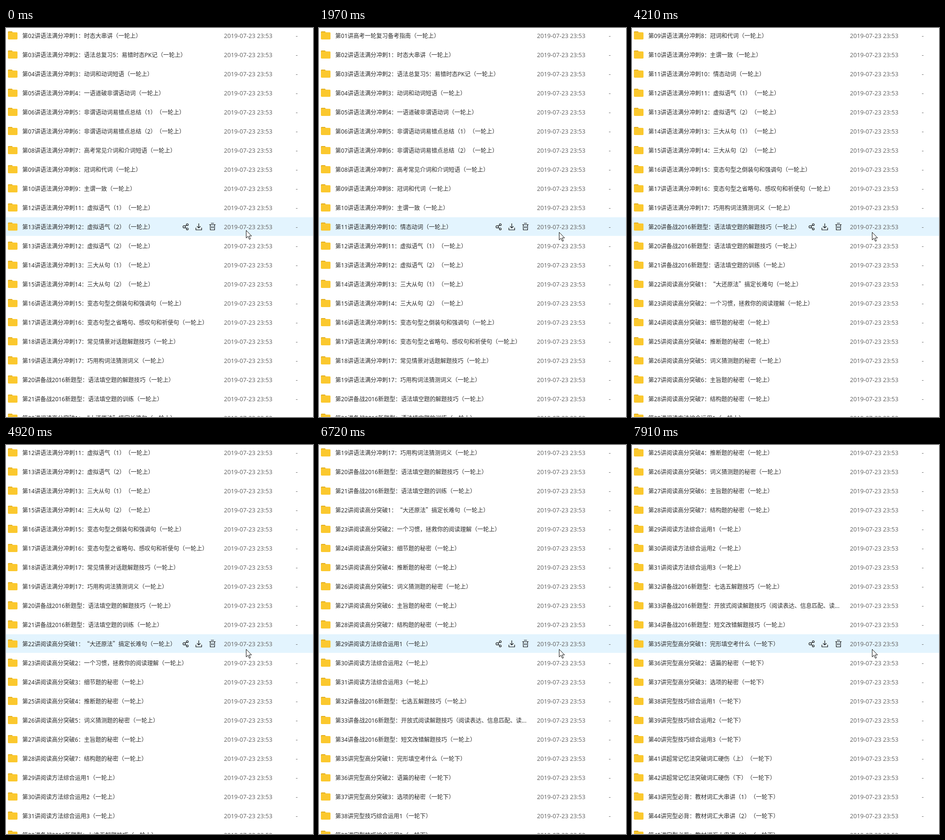
Write an HTML page that moves like this. It is 641 px wide and 814 px high and loops after 8000 ms.

```html
<!DOCTYPE html>
<html lang="zh-CN">
<head>
<meta charset="utf-8">
<title>课程列表</title>
<style>
html, body { margin: 0; width: 100%; height: 100%; overflow: hidden; background: #fff; }
svg { display: block; }
text { font: 12px "Noto Sans CJK SC", "Noto Sans CJK", sans-serif; text-spacing-trim: space-all; font-kerning: none; fill: #2b2b2b; }
.latin { font-family: "Noto Sans", sans-serif; }
.meta { font: 12.6px "Noto Sans", "Open Sans", sans-serif; fill: #6a6a6a; }
.icon { fill: none; stroke: #111; stroke-width: 1.2; }
</style>
</head>
<body>
<svg width="641" height="814" viewBox="0 0 641 814">
  <defs>
    <g id="folder">
      <path d="M4 14V8.5Q4 7 5.5 7H12Q13 7 13.5 8L14 9.5V14Z" fill="#e3b022"/>
      <rect x="4" y="9" width="20" height="15" rx="1.8" fill="#fbc82e"/>
    </g>
  </defs>
  <rect y="396" width="641" height="39" fill="#e3f4fe"/>
  <g id="rows"></g>
  <g class="icon">
    <circle cx="372" cy="416" r="2.5"/>
    <circle cx="378.5" cy="411.5" r="2"/>
    <circle cx="378.5" cy="420.5" r="2"/>
    <path d="M374 414.5L376.8 412.7M374 417.5L376.8 419.3"/>
    <path d="M402.5 409V418.5M398.8 414.8L402.5 418.5L406.2 414.8M396.5 418V422.5H408.5V418"/>
    <path d="M424.5 411.5H437.5M428 408.5H434M426.5 411.5V422.5H435.5V411.5M429.5 415V419M432.5 415V419"/>
  </g>
  <path id="cursor" d="M.5 .5V16.5L4.2 13L7 19.3L9.4 18.3L6.7 12.2H11.7Z" fill="#fff" stroke="#111"/>
</svg>
<script>
const LOOP = 8000, ROW = 40, COUNT = 21, HOVER = 10, HOVER_WIDTH = 323;

// "#" stands for the running number inside a chapter
const names = [''];
function chapter(prefix, titles, first = 1, last = 99) {
  titles.forEach((title, i) => {
    const n = names.length;
    const text = (prefix + title).replace('#', Math.min(first + i, last));
    const term = text.endsWith('...') ? '' : n < 35 ? '（一轮上）' : '（一轮下）';
    names.push(`第${String(n).padStart(2, '0')}讲${text}${term}`);
  });
}
const blank = ['', '', ''];
chapter('', ['高考一轮复习备考指南']);
chapter('语法满分冲刺#：', ['时态大串讲', '语法总复习5：易错时态PK记', '动词和动词短语', '一语道破非谓语动词',
  '非谓语动词易错点总结（1）', '非谓语动词易错点总结（2）', '高考常见介词和介词短语', '冠词和代词', '主谓一致',
  '情态动词', '虚拟语气（1）', '虚拟语气（2）', '三大从句（1）', '三大从句（2）', '变态句型之倒装句和强调句',
  '变态句型之省略句、感叹句和祈使句', '常见情景对话题解题技巧', '巧用构词法猜测词义'], 1, 17);
chapter('备战2016新题型：', ['语法填空题的解题技巧', '语法填空题的训练']);
chapter('阅读高分突破#：', ['“大还原法”搞定长难句', '一个习惯，拯救你的阅读理解', '细节题的秘密', '推断题的秘密',
  '词义猜测题的秘密', '主旨题的秘密', '结构题的秘密']);
chapter('阅读方法综合运用#', blank);
chapter('备战2016新题型：', ['七选五解题技巧', '开放式阅读解题技巧（阅读表达、信息匹配、读...', '短文改错解题技巧']);
chapter('完型高分突破#：', ['完形填空考什么', '语篇的秘密', '选项的秘密']);
chapter('完型技巧综合运用#', blank);
chapter('超常记忆法突破词汇硬伤', ['（上）', '（下）']);
chapter('完型必背：教材词汇大串讲（#）', blank);

// Scroll moves in order of time. A "late" move first redraws only the rows
// at the pointer; the rest of the list follows one tick behind.
const moves = [];
let end = 2;
function move(at, to, ticks, late) {
  moves.push({ at, from: end, to, ticks, late });
  end = to;
}
const late = (at, to, ticks) => move(at, to, ticks, true);
const plain = (at, to, ticks = 1) => move(at, to, ticks, false);
late(0, 4, 2);
plain(520, 5);
late(1820, 1, 1);
plain(3060, 4);
late(3490, 7, 2);
late(4060, 10, 2);
plain(4770, 13, 3);
late(5320, 15, 1);
late(5900, 17, 2);
plain(6420, 18);
late(6570, 19, 1);
for (const [i, at] of [7120, 7390, 7790].entries()) plain(at, 21 + 2 * i, 2);

function scrollAt(t) {
  const { at, from, to, ticks, late } = moves.findLast(m => m.at <= t);
  const tick = Math.floor((t - at) / (late ? 150 : 120)) + (late ? 0 : 1);
  const part = Math.min(tick / ticks, 1);
  return { top: Math.round(from + (to - from) * part), lead: late && part < 1 ? Math.sign(to - from) : 0 };
}

const rows = document.getElementById('rows');
const cursor = document.getElementById('cursor');
for (let k = 0; k < COUNT; k++) {
  rows.innerHTML += `<g transform="translate(0 ${k * ROW})"><use href="#folder"/>
    <text class="name" x="34" y="21"></text>
    <text class="meta" x="455" y="21">2019-07-23 23:53</text>
    <text class="meta" x="605" y="21">-</text></g>`;
}
const labels = [...rows.querySelectorAll('.name')];

function setText(label, text, max) {
  const show = s => label.innerHTML = s.replace(/\w+/g, '<tspan class="latin">$&</tspan>');
  show(text);
  while (label.getComputedTextLength() > max) {
    text = text.slice(0, -1);
    show(text.replace(/\.+$/, '') + '...');
  }
}

let shown;
function draw() {
  const t = performance.now() % LOOP;
  const { top, lead } = scrollAt(t);
  const key = top + ':' + lead;
  if (key !== shown) {
    shown = key;
    labels.forEach((label, k) => {
      const ahead = k === HOVER || k === HOVER - lead ? lead : 0;
      setText(label, names[top + k + ahead], k === HOVER ? HOVER_WIDTH : Infinity);
    });
  }
  const drift = Math.max(0, Math.min(4, Math.floor((t - 370) / 150)));
  cursor.setAttribute('transform', `translate(501 ${423 + drift})`);
  requestAnimationFrame(draw);
}
draw();
</script>
</body>
</html>
```
